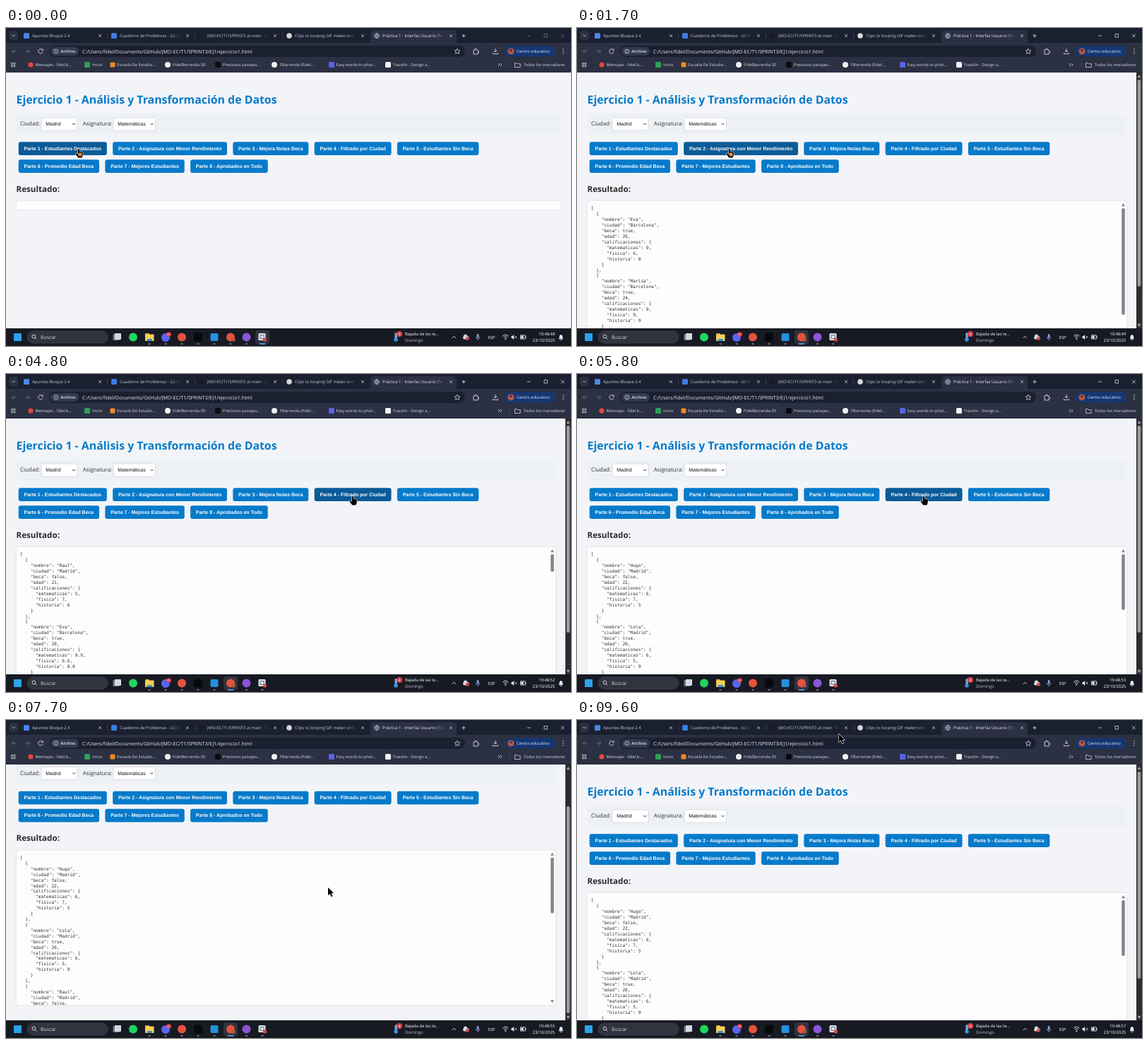
These frames come from a looping animation (800 px wide and 450 px high, 9700 ms). An HTML page with a canvas:

```html
<!DOCTYPE html>
<html lang="es">
<head>
<meta charset="utf-8">
<title>Análisis y Transformación de Datos</title>
<style>
html, body { margin: 0; width: 100%; height: 100%; overflow: hidden; }
canvas { display: block; width: 800px; height: 450px; }
</style>
</head>
<body>
<canvas id="stage" width="800" height="450"></canvas>
<script>
const ctx = document.getElementById('stage').getContext('2d');
const LOOP = 9700, STEP = 100;
const SANS = '"Open Sans", sans-serif';
const ARIAL = '"Liberation Sans", Arial, sans-serif';
const MONO = '"DejaVu Sans Mono", monospace';
const BLUE = [6, 122, 202], HOVER = [10, 91, 152];
const clamp = v => Math.max(0, Math.min(1, v));
const smooth = u => (u = clamp(u)) * u * (3 - 2 * u);

const buttonRows = [
  ['Parte 1 - Estudiantes Destacados', 'Parte 2 - Asignatura con Menor Rendimiento',
    'Parte 3 - Mejora Notas Beca', 'Parte 4 - Filtrado por Ciudad', 'Parte 5 - Estudiantes Sin Beca'],
  ['Parte 6 - Promedio Edad Beca', 'Parte 7 - Mejores Estudiantes', 'Parte 8 - Aprobados en Todo']
];
// hover interval of each of the first four buttons
const hovers = [[-1000, 980], [1020, 2950], [2960, 4210], [4240, 6550]];

// cursor moves: [start, end, x, y]
const moves = [
  [700, 1400, 216, 171], [2430, 3320, 375, 172], [3950, 4500, 491, 173],
  [6100, 6700, 487, 179], [6900, 7500, 456, 237], [8500, 9600, 371, 20]
];

// [name, city, grant, age, maths, physics, history]
const students = {
  top: [['Eva', 'Barcelona', true, 20, 9, 6, 8], ['Marisa', 'Barcelona', true, 24, 9, 9, 9]],
  raised: [['Raul', 'Madrid', false, 21, 5, 7, 6], ['Eva', 'Barcelona', true, 20, 9.9, 6.6, 8.8]],
  city: [['Hugo', 'Madrid', false, 22, 6, 7, 5], ['Lola', 'Madrid', true, 20, 6, 5, 9],
    ['Raul', 'Madrid', false, 21, 5, 7, 6]]
};
const toJson = list => JSON.stringify(list.map(
  ([nombre, ciudad, beca, edad, matematicas, fisica, historia]) =>
    ({ nombre, ciudad, beca, edad, calificaciones: { matematicas, fisica, historia } })
), null, 2).split('\n');

// each result: start time, lines, box height, inner thumb height
const results = [
  { at: 0, lines: [], height: 12 },
  { at: 500, lines: toJson(students.top), height: 219, thumb: 151 },
  { at: 2200, lines: ['"matematicas"'], height: 19 },
  { at: 3700, lines: toJson(students.raised), height: 219, thumb: 25 },
  { at: 5200, lines: toJson(students.city), height: 219, thumb: 79 }
];

function setFont(size, font, weight = 400) {
  ctx.font = `${weight} ${size}px ${font}`;
  ctx.textRendering = 'geometricPrecision';
}
function text(str, x, y, size, color, { font = SANS, weight, align = 'left', clip } = {}) {
  ctx.save();
  if (clip) {
    ctx.beginPath();
    ctx.rect(x, y - 10, clip - x, 20);
    ctx.clip();
    const fade = ctx.createLinearGradient(clip - 12, 0, clip, 0);
    fade.addColorStop(0, color);
    fade.addColorStop(1, color + '00');
    color = fade;
  }
  setFont(size, font, weight);
  ctx.textAlign = align;
  ctx.fillStyle = color;
  ctx.fillText(str, x, y + size * 0.36);
  ctx.restore();
}
function box(x, y, w, h, color, radius = 0, border) {
  ctx.beginPath();
  ctx.roundRect(x, y, w, h, radius);
  ctx.fillStyle = color;
  ctx.fill();
  if (border) { ctx.strokeStyle = border; ctx.lineWidth = 0.6; ctx.stroke(); }
}
function disc(x, y, r, color) {
  ctx.beginPath();
  ctx.arc(x, y, r, 0, 7);
  ctx.fillStyle = color;
  ctx.fill();
}
const square = (x, y, size, color, radius = 1.5) =>
  box(x - size / 2, y - size / 2, size, size, color, radius);
function stroke(path, color, width = 0.9) {
  ctx.strokeStyle = color;
  ctx.lineWidth = width;
  ctx.stroke(new Path2D(path));
}
function shape(path, color) {
  ctx.fillStyle = color;
  ctx.fill(new Path2D(path));
}

function scrollbar(x, top, bottom, thumbY, thumbH, color) {
  shape(`M${x - 2.6} ${top + 2.2}h5.2l-2.6 -4.2z`, color);
  shape(`M${x - 2.6} ${bottom - 2.2}h5.2l-2.6 4.2z`, color);
  box(x - 2.3, thumbY, 4.6, thumbH, color, 2.3);
}

function drawSelect(label, x, w) {
  box(x, 127, w, 18, '#fff', 2, '#c8ccd0');
  text(label, x + 6.3, 136, 6.94, '#111', { font: ARIAL });
  stroke(`M${x + w - 7} 135l2 2l2 -2`, '#222');
}

function drawButtons(t) {
  buttonRows.forEach((row, r) => {
    let x = 17.7;
    const y = 161.2 + r * 25;
    row.forEach((label, i) => {
      setFont(6.94, ARIAL, 700);
      const w = ctx.measureText(label).width + 15.6;
      const [from, to] = r === 0 && hovers[i] || [1e9, 1e9];
      const k = t < to ? clamp((t - from) / 250) : 1 - clamp((t - to) / 250);
      box(x, y, w, 18.7, `rgb(${BLUE.map((c, j) => c + (HOVER[j] - c) * k)})`, 3);
      text(label, x + 7.8, y + 9.1, 6.94, '#ffffff', { font: ARIAL, weight: 700 });
      x += w + 8.35;
    });
  });
}

function drawPage(t, scroll) {
  const result = results.filter(r => t >= r.at).pop();
  const tall = result.height > 100;
  const right = tall ? 778 : 785.5;
  ctx.save();
  ctx.beginPath();
  ctx.rect(0, 63, 800, 362);
  ctx.clip();
  box(0, 63, 800, 362, '#f2f4f8');
  ctx.translate(0, -scroll);

  text('Ejercicio 1 - Análisis y Transformación de Datos', 14.5, 101, 15.87, '#067aca', { weight: 700 });
  box(15, 122, right - 15, 28.5, '#edf0f4', 4);
  text('Ciudad:', 20, 135.5, 7.9, '#333333');
  drawSelect('Madrid', 50, 51);
  text('Asignatura:', 108.7, 135.5, 7.9, '#333333');
  drawSelect('Matemáticas', 152, 59.5);
  drawButtons(t);

  text('Resultado:', 14.5, 227.5, 11.63, '#2b2b2b', { weight: 700 });
  ctx.save();
  ctx.shadowColor = 'rgba(0,0,0,.12)';
  ctx.shadowBlur = 3;
  box(15, 245, right - 15, result.height, '#fdfdfe', 3);
  ctx.restore();
  ctx.save();
  ctx.beginPath();
  ctx.rect(15, 245, right - 15, result.height);
  ctx.clip();
  result.lines.forEach((line, i) =>
    text(line, 19.8, 255.2 + i * 7.92, 6.18, '#333333', { font: MONO }));
  if (tall) scrollbar(773.5, 250, 459, 255, result.thumb, '#858688');
  ctx.restore();
  ctx.restore();

  if (tall) {
    box(792, 63, 8, 362, '#2b2c31');
    scrollbar(796, 68, 421, 73 + scroll * 0.81, 293, '#9d9ea2');
  }
}

function drawTab(title, x, clip, active) {
  text(title, x, 11, 5.9, active ? '#e6e9f2' : '#c3c8d6', { clip });
  stroke(`M${clip + 8} 9l4 4m0 -4l-4 4`, '#c3c8d6', 0.8);
}

function drawBrowser(focused) {
  const light = '#d5d9e4', dim = '#6e7486';
  box(0, 0, 800, 21, '#1b2030');
  box(0, 21, 800, 42, '#2b3042');
  box(516, 3, 122, 22, '#2b3042', 5);
  box(4, 4, 13, 13, '#2b3042', 4);
  stroke('M8.5 9.7l2.2 2.2l2.2 -2.2', light);
  [143.5, 267.5, 391.5].forEach(x => box(x, 7, 0.6, 8, '#4a5064'));

  square(29, 11, 8, '#4a86e8');
  square(153, 11, 8, '#3f7de0');
  if (focused) disc(277, 11, 3.6, '#15192a');
  disc(401, 11, 3.8, '#d8d8d8');
  stroke('M521.5 11a3.5 3.5 0 1 0 7 0a3.5 3.5 0 1 0 -7 0M521.5 11h7M525 7.5q-3 3.5 0 7q3 -3.5 0 -7', '#b9bfce', 0.8);
  drawTab('Apuntes Bloque 2.4', 37, 123);
  drawTab('Cuaderno de Problemas - U2 Bloque', 161, 247);
  drawTab('JMO-EC/T1/SPRINT3 at main · FBarrenda', 285, 371);
  drawTab('Clips to looping GIF maker online', 409, 495);
  drawTab('Práctica 1 - Interfaz Usuario (Tema 3)', 533, 620, true);
  stroke('M645.5 11h5M648 8.5v5', light);
  stroke('M738 11h5M762 8.5h4.5v4.5h-4.5zM786 8.7l4.6 4.6m0 -4.6l-4.6 4.6', focused ? light : dim, 0.8);

  // toolbar
  stroke('M14.5 33h-6m2.6 -2.6l-2.6 2.6l2.6 2.6M27.5 33h6m-2.6 -2.6l2.6 2.6l-2.6 2.6', dim);
  stroke('M51.6 31a3.2 3.2 0 1 0 .5 2.6M52.2 29.4v2.2h-2.2', light);
  box(61, 25, 589, 16, '#1b2030', 8);
  box(63, 27, 40, 12, '#333950', 6);
  stroke('M67.8 33a3 3 0 1 0 6 0a3 3 0 1 0 -6 0M70.8 32.6v2M70.8 31v.8', light, 0.8);
  text('Archivo', 77.3, 33, 5.9, '#e6e9f2', { weight: 600 });
  text('C:/Users/fidel/Documents/GitHub/JMO-EC/T1/SPRINT3/EJ1/ejercicio1.html', 108, 33, 7.03, '#e6e9f2');
  stroke('M639 29.2l1.1 2.5l2.7 .3l-2 1.8l.6 2.7l-2.4 -1.4l-2.4 1.4l.6 -2.7l-2 -1.8l2.7 -.3z', light, 0.8);
  stroke('M662 31h2v-1.5h2v1.5h2v2h1.4v2h-1.4v2h-6z', light);
  stroke('M693 29v5m-2.2 -2.2l2.2 2.2l2.2 -2.2M689.5 35v1.6h7v-1.6', light);
  box(706, 25.5, 72, 15, '#153772', 7.5);
  disc(715, 33, 4.6, '#b4563f');
  disc(715, 31.5, 1.6, '#3a2a55');
  text('Centro educativo', 723, 33, 5.9, '#dbe6ff');
  [30, 33, 36].forEach(y => disc(789, y, 0.75, light));

  // bookmarks
  [7.5, 11].forEach(x => [49.2, 52.8].forEach(y => stroke(`M${x} ${y}h2v2h-2z`, light, 0.7)));
  disc(35, 52, 3.6, '#e0483e');
  square(115, 52, 8, '#2f9e5b');
  square(151, 52, 7, '#f08a24');
  disc(229, 52, 4, '#f2f2f2');
  square(300, 52, 8, '#0b0b0e');
  disc(380, 52, 4, '#f2f2f2');
  square(461, 52, 8, '#5a63e8');
  square(541, 52, 8, '#f2f2f2');
  [
    ['Mensajes - fidel.b...', 41.5], ['Inicio', 122], ['Escuela De Estudio...', 157],
    ['FidelBarrenda-30', 236], ['Preciosos paisajes...', 307], ['FBarrenda (Fidel...', 388],
    ['Easy words-to-phot...', 467.5], ['Trazolin - Design a...', 547.5], ['Todos los marcadores', 733]
  ].forEach(([label, x]) => text(label, x, 52, 5.75, light));
  stroke('M697 50l2 2l-2 2M700 50l2 2l-2 2', light, 0.8);
  box(713, 48, 0.6, 8, '#4a5064');
  stroke('M720.5 49.5h2.7l1 1.2h4v4.8h-7.7z', light, 0.8);
}

function drawTaskbar(t, focused) {
  const light = '#e4e6ee';
  box(0, 425, 800, 25, '#181a23');
  square(16.5, 437.5, 11, '#2aa3ea', 1);
  box(30, 429, 114, 17, '#31343f', 8.5, '#444854');
  stroke('M37 436.5a2.4 2.4 0 1 0 4.8 0a2.4 2.4 0 1 0 -4.8 0M41.2 438.3l2 2', light);
  text('Buscar', 49, 437.5, 6.9, '#d5d8e2');

  const activeX = focused ? 318 : 363;
  box(activeX - 10, 428, 20, 19, '#30333e', 3);
  box(151.5, 433, 9, 9, '#73798a', 1);
  box(154, 432, 9, 9, '#d5d8e0', 1);
  disc(180, 437.5, 6, '#1ed760');
  box(197, 432, 6, 4, '#e0a526', 1);
  box(197, 433.5, 12.5, 9.5, '#f8cf57', 1);
  box(199.5, 440, 7.5, 3, '#2f8fd8', 1);
  disc(226, 438, 6, '#5865f2');
  disc(230.5, 433.5, 3.3, '#e0404a');
  text('9+', 230.5, 433.4, 3.8, '#ffffff', { align: 'center' });
  disc(249, 437.5, 6, '#e5533d');
  square(272, 437.5, 12, '#08090c', 2.5);
  square(295, 437.5, 11, '#2391dc', 2);
  disc(318, 437.5, 6, '#e5533d');
  disc(322, 441, 2.8, '#b4563f');
  disc(340.5, 437.5, 6, '#8a55d7');
  box(357.5, 432, 10, 10, '#dfe3ea', 1.5);
  stroke('M360 434.5h5v5h-5z', '#55657d');
  disc(366.5, 441, 2.6, '#d9473f');
  [203, 226, 249, 272, 295, 318, 340.5, 363].forEach(x => x === activeX
    ? box(x - 4.5, 446.3, 9, 1.5, '#5fb8f2', 0.7)
    : box(x - 1.6, 446.3, 3.2, 1.5, '#8d92a0', 0.7));

  // tray
  box(550.5, 431, 3.2, 9, '#6fb4e8', 1.6);
  disc(552, 441, 2.8, '#3d8fe0');
  disc(557, 433, 4, '#d9414a');
  text('4', 557, 433, 5, '#ffffff', { align: 'center' });
  text('Bajada de las te...', 565, 433.3, 5.9, '#ffffff');
  text('Domingo', 565, 441.5, 6, '#b9bdca');
  stroke('M631.7 438.8l2.6 -2.6l2.6 2.6', light);
  box(647, 436, 8.5, 4.5, '#d5d8e0', 2.2);
  disc(650.5, 436, 2.6, '#d5d8e0');
  disc(653.5, 439.5, 2.4, '#d9414a');
  box(666.8, 433, 2.6, 5.5, '#8fa2e8', 1.3);
  stroke('M665.4 437q0 3 2.7 3t2.7 -3M668.1 440v2', '#8fa2e8', 0.8);
  text('ESP', 682.7, 437.5, 5.8, '#ffffff');
  stroke('M703.3 436q4 -3.6 8 0M704.9 437.8q2.4 -2 4.8 0', light, 1);
  disc(707.3, 440, 1, light);
  shape('M715.5 436h1.5l2.2 -2v7l-2.2 -2h-1.5z', light);
  stroke('M720.6 436l2.6 2.8m0 -2.8l-2.6 2.8', light, 0.8);
  stroke('M728.5 434.8h6.8v5.2h-6.8zM736.2 436.4v2', light);
  box(729.3, 435.6, 3.5, 3.6, light);
  const seconds = 48 + Math.floor((t + 100) / 1000);
  text('19:48:' + seconds, 777.3, 433.3, 5.85, '#ffffff', { align: 'right' });
  text('23/10/2025', 777.3, 441.5, 6, '#ffffff', { align: 'right' });
  shape('M782.5 440.2l1 -1.6v-2q.2 -2.6 2.3 -2.6t2.3 2.6v2l1 1.6zM785 441h1.8v1h-1.8z', light);
}

function drawCursor(t) {
  let x = 103, y = 171;
  for (const [from, to, nx, ny] of moves) {
    const k = smooth((t - from) / (to - from));
    x += (nx - x) * k;
    y += (ny - y) * k;
  }
  const hand = hovers.some(([from, to]) => t >= from && t < to);
  const outline = new Path2D(hand
    ? 'M-1.2 .2q1.1 -1.2 2 .2v3.2l4.2 1q1.2 .4 1 2l-.6 3.6l-1 2.3h-5.2l-3.5 -4.8q-.6 -1.5 1 -1.4l2.1 1.4z'
    : 'M0 0v11.2l2.5 -2.4l2 4.4l2 -.9l-2 -4.2h3.5z');
  ctx.save();
  ctx.translate(x, y);
  ctx.lineJoin = 'round';
  ctx.lineWidth = 1.3;
  ctx.strokeStyle = 'rgba(255,255,255,.85)';
  ctx.stroke(outline);
  ctx.fillStyle = '#000';
  ctx.fill(outline);
  // the first two clicks leave a warm tint on the palm
  if (t < 2400) box(-0.8, 5.2, 5.4, 5.4, '#dd8a45', 2);
  ctx.restore();
}

function draw(now) {
  const t = Math.floor(now % LOOP / STEP) * STEP;
  const focused = t >= 400;
  const scroll = 60.5 * (Math.sin(clamp((t - 6500) / 260) * Math.PI / 2) - smooth((t - 8300) / 300));
  drawPage(t, scroll);
  drawBrowser(focused);
  drawTaskbar(t, focused);
  drawCursor(t);
}

const start = performance.now();
function tick() {
  draw(performance.now() - start);
  requestAnimationFrame(tick);
}
tick();
</script>
</body>
</html>
```
